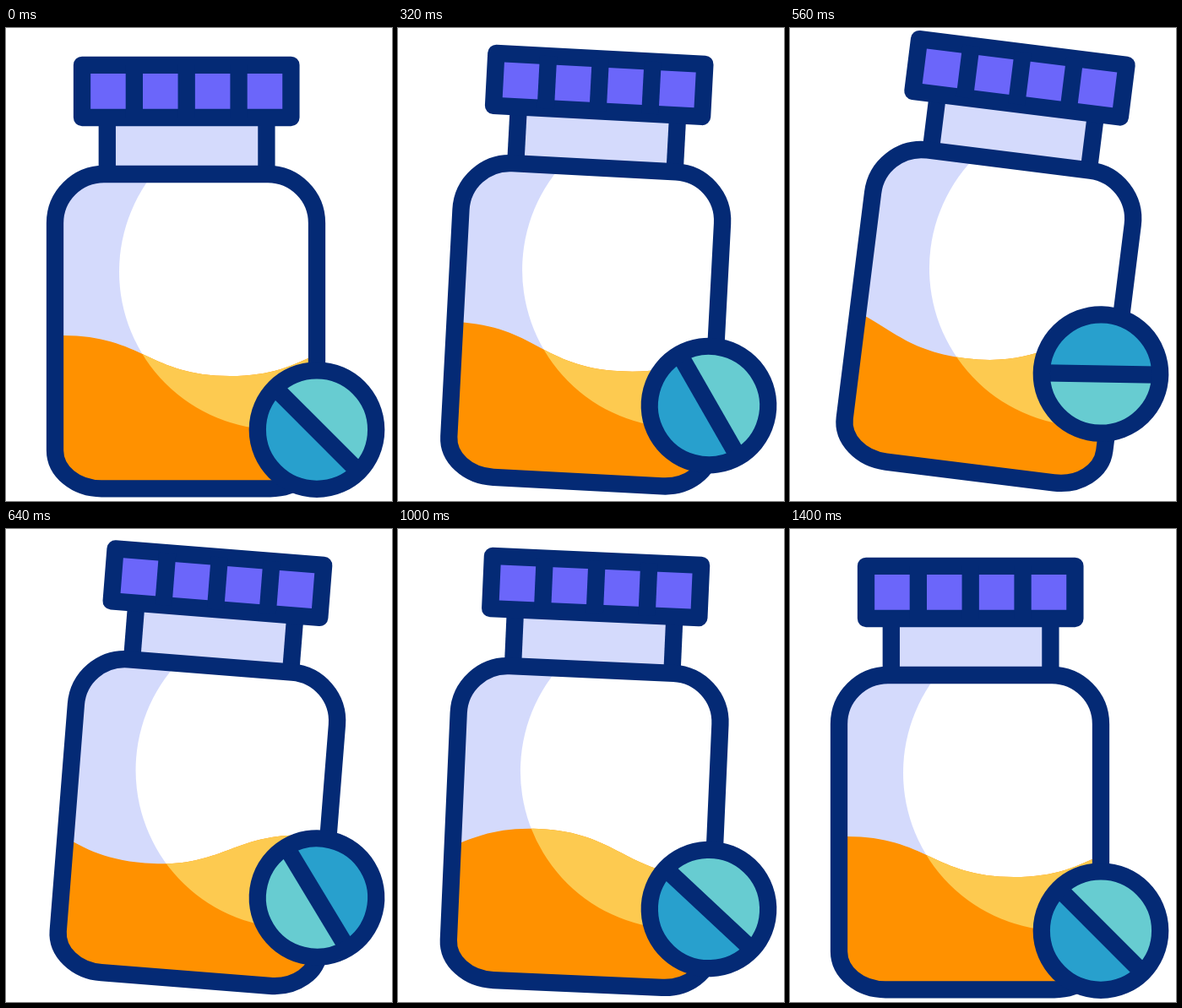
Animation, 457 px wide and 560 px high, one loop 2 s. Source, as an HTML page with a canvas:

```html
<!DOCTYPE html>
<html lang="en">
<head>
<meta charset="utf-8">
<title>Medicine bottle</title>
<style>
  html, body { margin: 0; width: 100%; height: 100%; overflow: hidden; background: #fff; }
  canvas { display: block; }
</style>
</head>
<body>
<canvas id="stage" width="457" height="560"></canvas>
<script>
const ctx = document.getElementById('stage').getContext('2d');
const LOOP = 2000, STEP = 40;
const NAVY = '#042a75', LAVENDER = '#d4dafc', PURPLE = '#6b66fa';
const ORANGE = '#ff9100', YELLOW = '#fdca50', TEAL = '#67ccd1', BLUE = '#28a0cd';
const LINE = 20.3;

// Keys are [time, value] pairs
const TILT = [[200, 0], [480, 8], [840, -0.6], [1060, 3.1], [1320, 0]];
const LIFT = [[200, 0], [480, 75.5], [800, 2.7], [1060, 28.4], [1320, 0]];
const SPIN = [[197, 45], [1045, 405]];
const FLOW = [[200, 0], [1400, 1]];

const PIVOT = { x: 368, y: 535 };
const WAVE = { x: 67, half: 198, top: 364, bottom: 412 };

// cubic-bezier(.42, 0, .58, 1)
function easeInOut(p) {
  let lo = 0, hi = 1;
  for (let i = 0; i < 24; i++) {
    const s = (lo + hi) / 2, r = 1 - s;
    const x = 1.26 * s * r * r + 1.74 * s * s * r + s * s * s;
    if (x < p) lo = s; else hi = s;
  }
  return lo * lo * (3 - 2 * lo);
}

function track(keys, t) {
  if (t <= keys[0][0]) return keys[0][1];
  for (let i = 1; i < keys.length; i++) {
    const [t0, a] = keys[i - 1], [t1, b] = keys[i];
    if (t < t1) return a + (b - a) * easeInOut((t - t0) / (t1 - t0));
  }
  return keys[keys.length - 1][1];
}

const radians = deg => deg * Math.PI / 180;

function bodyPath() {
  const p = new Path2D();
  p.moveTo(116, 173);
  p.lineTo(310, 173);
  p.arc(310, 231, 58, -Math.PI / 2, 0);
  p.lineTo(368, 500);
  p.ellipse(313, 500, 55, 45.3, 0, 0, Math.PI / 2);
  p.lineTo(113, 545.3);
  p.ellipse(113, 500, 55, 45.3, 0, Math.PI / 2, Math.PI);
  p.lineTo(58, 231);
  p.arc(116, 231, 58, Math.PI, Math.PI * 1.5);
  p.closePath();
  return p;
}

function wavePath(shift) {
  const { half, top, bottom } = WAVE, grip = half * 0.48;
  let x = WAVE.x - shift * half * 2, y = top;
  const p = new Path2D();
  p.moveTo(x, y);
  for (let i = 0; i < 4; i++) {
    const next = y === top ? bottom : top;
    p.bezierCurveTo(x + grip, y, x + half - grip, next, x + half, next);
    x += half;
    y = next;
  }
  p.lineTo(x, 560);
  p.lineTo(WAVE.x - shift * half * 2, 560);
  p.closePath();
  return p;
}

const BODY = bodyPath();
const GLARE = new Path2D();
GLARE.arc(321, 288.5, 187, 0, Math.PI * 2);

function fill(path, color) {
  ctx.fillStyle = color;
  ctx.fill(path);
}

function line(x0, y0, x1, y1) {
  ctx.beginPath();
  ctx.moveTo(x0, y0);
  ctx.lineTo(x1, y1);
  ctx.stroke();
}

function drawContents(flow) {
  const wave = wavePath(flow);
  ctx.save();
  ctx.clip(BODY);
  fill(BODY, LAVENDER);
  fill(GLARE, '#fff');
  // Left of the wave's start the liquid is hidden behind the wall
  fill(wave, ORANGE);
  ctx.clip(wave);
  fill(GLARE, YELLOW);
  ctx.restore();
}

function drawBottle(tilt, flow) {
  ctx.save();
  ctx.translate(PIVOT.x, PIVOT.y);
  ctx.rotate(radians(tilt));
  ctx.translate(-PIVOT.x, -PIVOT.y);
  ctx.strokeStyle = NAVY;
  ctx.lineWidth = LINE;
  ctx.lineJoin = 'round';

  ctx.fillStyle = LAVENDER;
  ctx.fillRect(120, 106, 188, 67);
  drawContents(flow);
  line(119.8, 106, 119.8, 173);
  line(308.4, 106, 308.4, 173);
  ctx.stroke(BODY);

  ctx.fillStyle = PURPLE;
  ctx.fillRect(90, 43.8, 247.4, 62.2);
  ctx.strokeRect(90, 43.8, 247.4, 62.2);
  for (let i = 1; i < 4; i++) {
    const x = 90 + 247.4 * i / 4;
    line(x, 43.8, x, 106);
  }
  ctx.restore();
}

function drawPill(lift, spin) {
  ctx.save();
  ctx.translate(368, 475.6 - lift);
  ctx.rotate(radians(spin));
  ctx.strokeStyle = NAVY;
  ctx.lineWidth = LINE;
  [[TEAL, Math.PI], [BLUE, 0]].forEach(([color, start]) => {
    ctx.fillStyle = color;
    ctx.beginPath();
    ctx.arc(0, 0, 70.2, start, start + Math.PI);
    ctx.fill();
  });
  line(-66, 0, 66, 0);
  ctx.beginPath();
  ctx.arc(0, 0, 70.2, 0, Math.PI * 2);
  ctx.stroke();
  ctx.restore();
}

function draw(t) {
  ctx.fillStyle = '#fff';
  ctx.fillRect(0, 0, 457, 560);
  drawBottle(track(TILT, t), track(FLOW, t));
  drawPill(track(LIFT, t), track(SPIN, t));
}

const start = performance.now();
function frame() {
  const elapsed = (performance.now() - start) % LOOP;
  draw(Math.floor(elapsed / STEP) * STEP);
  requestAnimationFrame(frame);
}
frame();
</script>
</body>
</html>
```
